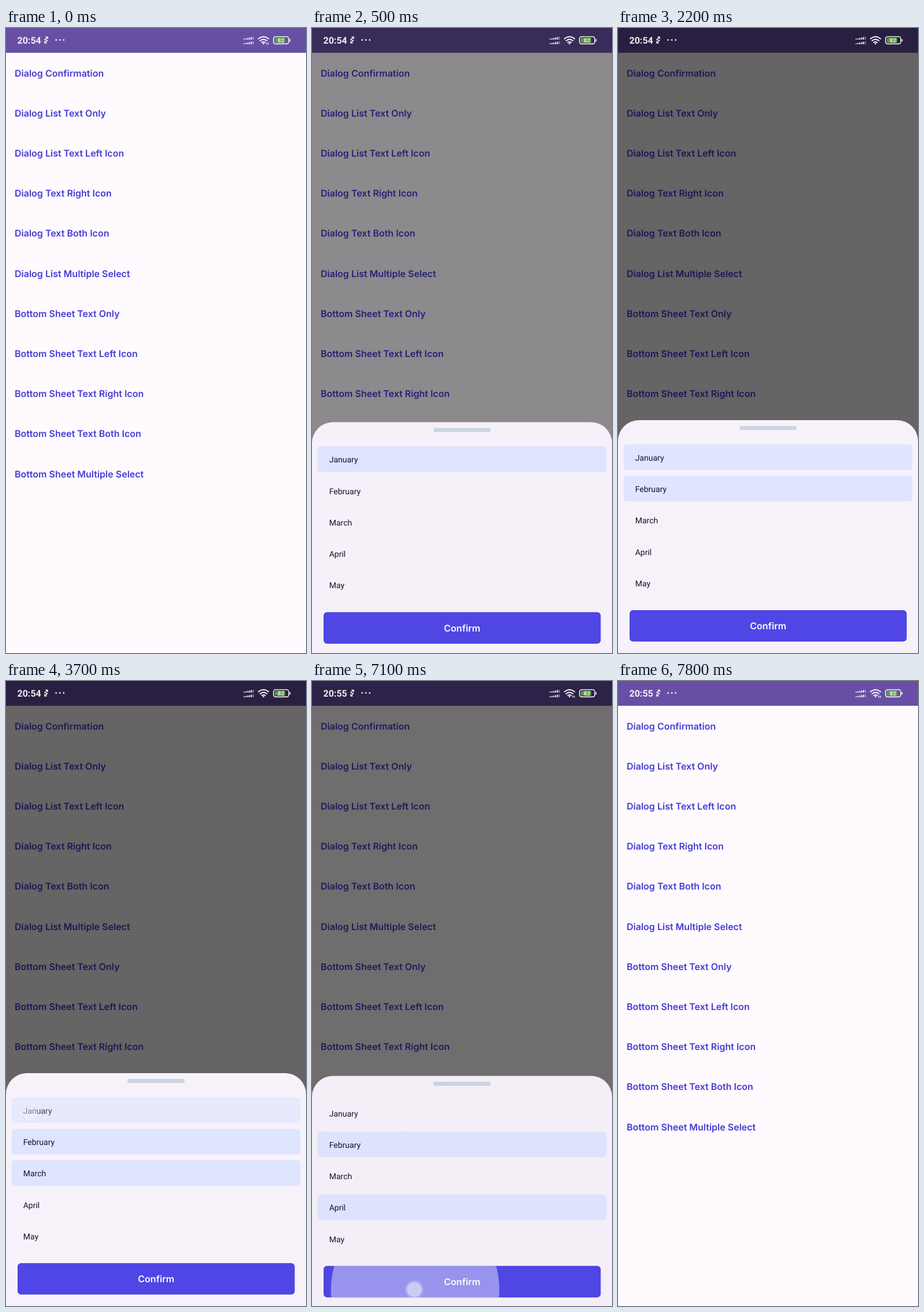
These frames come from a looping animation (519 by 1079 pixels, 8000 ms). An HTML page:

```html
<!DOCTYPE html>
<html lang="en">
<head>
<meta charset="utf-8">
<title>Bottom sheet demo</title>
<style>
  html, body { margin: 0; width: 100%; height: 100%; overflow: hidden; background: #fffafe; }
  svg { display: block; width: 519px; height: 1079px; }
  text { text-rendering: geometricPrecision; font-optical-sizing: none; }
  .item, .button { font: 600 16px Inter, sans-serif; }
  .item { fill: #453bd4; }
  .button { fill: #fff; text-anchor: middle; }
  .month { font: 14px Roboto, sans-serif; fill: #11132b; }
  .clock { font: 600 16px Roboto, sans-serif; }
  .charge { font: 700 10px Roboto, sans-serif; text-anchor: middle; fill: #fff; }
  .line { fill: none; stroke: #fff; stroke-linecap: round; }
</style>
</head>
<body>
<svg viewBox="0 0 519 1079">
  <clipPath id="rowClip"><rect y="735" width="519" height="69" rx="7"/></clipPath>
  <clipPath id="buttonClip"><rect x="20" y="1005" width="479.5" height="54.3" rx="6"/></clipPath>
  <rect width="519" height="1079" fill="#fffafe"/>
  <rect width="519" height="42.8" fill="#6750a4"/>
  <circle id="rowRipple" fill="#4f46e5" clip-path="url(#rowClip)"/>
  <g id="items"></g>
  <rect id="scrim" width="519" height="1079"/>

  <g fill="#fff" opacity=".92">
    <text id="clock" class="clock" x="19.5" y="27"></text>
    <path class="line" stroke-width="1.5" d="M69 15.5H72V18.5M72 15.5L67 20L71.5 21.5L67 26M67 23V26H70"/>
    <circle cx="86.7" cy="20.7" r="1.4"/><circle cx="93.2" cy="20.7" r="1.4"/><circle cx="99.8" cy="20.7" r="1.4"/>
    <g id="signal"></g>
    <path class="line" stroke-width="2" d="M436.8 18.6Q445.5 11.5 454.2 18.6M439.6 22Q445.5 17.3 451.4 22M442.5 25Q445.5 22.8 448.5 25"/>
    <circle cx="445.5" cy="27" r="1.4"/>
    <path id="traffic" class="line" stroke-width="1" d="M451.3 28.5V25.5L450.2 26.7M453.7 25.5V28.5L454.8 27.3"/>
    <rect class="line" x="462.8" y="15" width="26.4" height="12.4" rx="3.6" stroke-width="1.6"/>
    <rect x="490.5" y="19" width="1.8" height="4.5" rx=".9"/>
    <rect x="465" y="17.1" width="18" height="8.2" rx="1.5" fill="#55ae25"/>
    <text class="charge" x="475.7" y="24.9">82</text>
  </g>

  <g id="sheet">
    <path d="M0 1200V713A36 36 0 0 1 36 677H483A36 36 0 0 1 519 713V1200Z" fill="#f7f2fa"/>
    <rect x="210" y="687" width="99" height="7" rx="3.5" fill="#cbd5e1"/>
    <g id="months"></g>
    <rect x="20" y="1005" width="479.5" height="54.3" rx="6" fill="#4f46e5"/>
    <circle id="buttonRipple" fill="#fff" clip-path="url(#buttonClip)"/>
    <text class="button" x="259.7" y="1038">Confirm</text>
  </g>
  <g id="touch">
    <circle r="16.5" fill="#fff" opacity=".16"/>
    <circle r="13" fill="#fff" fill-opacity=".55" stroke="#c3c6ea" stroke-opacity=".7" stroke-width="1.5"/>
  </g>
</svg>
<script>
const LOOP = 8000, CLICK_FADE = 250, ROW_PITCH = 54.25;
const items = ['Dialog Confirmation', 'Dialog List Text Only', 'Dialog List Text Left Icon',
  'Dialog Text Right Icon', 'Dialog Text Both Icon', 'Dialog List Multiple Select',
  'Bottom Sheet Text Only', 'Bottom Sheet Text Left Icon', 'Bottom Sheet Text Right Icon',
  'Bottom Sheet Text Both Icon', 'Bottom Sheet Multiple Select'];
const months = ['January', 'February', 'March', 'April', 'May'];

// [month index, start of the cross-fade]
const toggles = [[1, 1900], [2, 2400], [0, 3600], [1, 4310], [2, 4700], [3, 5400], [1, 5640]];
// [press, release, x, y]
const taps = [[130, 290, 180, 770], [1800, 1910, 42, 800], [2300, 2410, 42, 854],
  [3500, 3640, 42, 748], [4210, 4320, 42, 800], [4600, 4710, 42, 854],
  [5300, 5390, 42, 908], [5550, 5640, 42, 800], [6960, 7080, 177, 1050.5]];

const $ = id => document.getElementById(id);
const set = (el, attrs) => { for (const k in attrs) el.setAttribute(k, attrs[k]); };
const progress = (t, start, length) => Math.min(1, Math.max(0, (t - start) / length));
const smooth = p => (1 - Math.cos(Math.PI * p)) / 2;

$('items').innerHTML = items.map((s, i) =>
  `<text class="item" x="15" y="${83.6 + i * 69.2}">${s}</text>`).join('');
$('months').innerHTML = months.map((s, i) =>
  `<rect x="9.5" y="${718.7 + i * ROW_PITCH}" width="500" height="44.5" rx="5.5" fill="#dfe5ff"/>
   <text class="month" x="29.7" y="${746.8 + i * ROW_PITCH}">${s}</text>`).join('');
$('signal').innerHTML = [20, 28].map(base => [0, 1, 2, 3, 4, 5].map(i => {
  const h = 1.5 + i * .7;
  return `<rect x="${411 + i * 3.2}" y="${base - h}" width="2" height="${h}" opacity="${i < 5 ? 1 : .4}"/>`;
}).join('')).join('');

function drawMonth(i, t) {
  const [box, label] = [$('months').children[2 * i], $('months').children[2 * i + 1]];
  let selected = i === 0 ? 1 : 0, textAlpha = 1;
  for (const [row, start] of toggles) {
    if (row !== i || t < start) continue;
    const p = smooth(progress(t, start, CLICK_FADE));
    selected += (1 - 2 * selected) * p;
    textAlpha = 1 - p * (1 - p);
  }
  set(box, { opacity: selected });
  set(label, { opacity: textAlpha });
}

// The circle grows from the touch point and drifts to the centre of its box.
function drawRipple(el, t, start, end, from, centre, width, height) {
  const p = 1 - (1 - progress(t, start, 225)) ** 2;
  const first = .3 * width, last = Math.hypot(width, height) / 2;
  set(el, {
    cx: from[0] + (centre[0] - from[0]) * p,
    cy: from[1] + (centre[1] - from[1]) * p,
    r: first + (last - first) * p,
    opacity: t < start ? 0 : .42 * (1 - progress(t, end, 150))
  });
}

function draw(t) {
  const opening = progress(t, 285, 250), closing = progress(t, 7052, 200);
  const drop = 1 - smooth(opening) + closing ** 2;
  const alpha = (1 - (1 - opening) ** 2.6) * (1 - closing ** 3);
  set($('sheet'), { transform: `translate(0 ${80.4 * drop})`, opacity: alpha });
  const dim = smooth(progress(t, 300, 300)) - smooth(progress(t, 7060, 250));
  set($('scrim'), { opacity: .6 * dim });

  months.forEach((_, i) => drawMonth(i, t));
  drawRipple($('rowRipple'), t, 150, 500, [180, 770], [259.5, 769.5], 519, 69);
  drawRipple($('buttonRipple'), t, 7099, 7250, [177, 1046], [259.7, 1032], 480, 54);

  const tap = taps.find(([down, up]) => t >= down && t < up + 120);
  set($('touch'), tap
    ? { transform: `translate(${tap[2]} ${tap[3]})`,
        opacity: progress(t, tap[0], 50) * (1 - progress(t, tap[1], 120)) }
    : { opacity: 0 });

  $('clock').textContent = t < 6400 ? '20:54' : '20:55';
  set($('traffic'), { opacity: t < 350 || t > 6900 ? 1 : 0 });
}

const begin = performance.now();
function tick() {
  draw((performance.now() - begin) % LOOP);
  requestAnimationFrame(tick);
}
tick();
</script>
</body>
</html>
```
